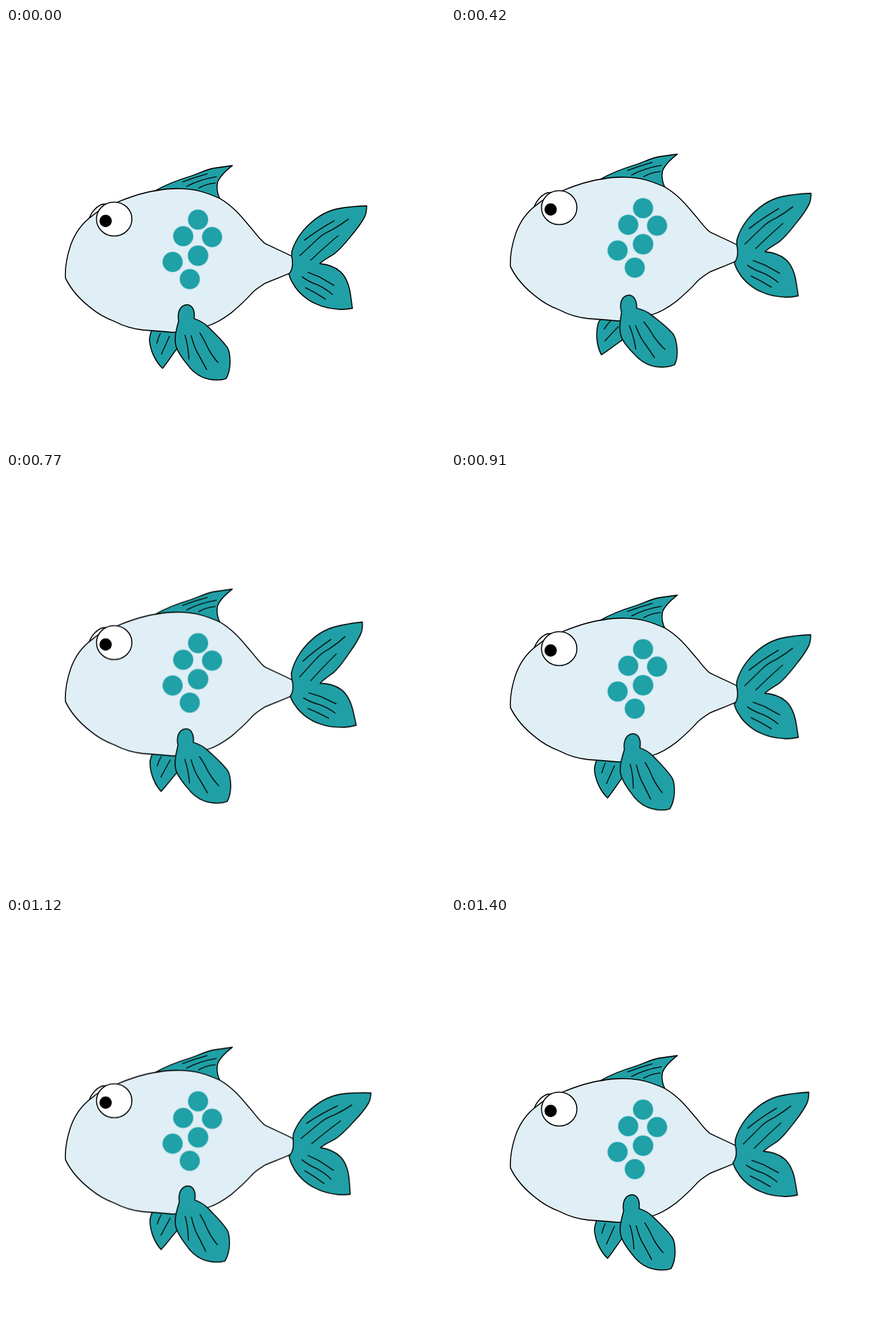
Recreate the animation shown at these times as an HTML page without scripts. Size 768x729 px, loop 1470 ms.

```html
<!DOCTYPE html>
<html lang="en">
<head>
<meta charset="utf-8">
<title>Swimming fish</title>
<style>
  html, body { margin: 0; width: 100%; height: 100%; overflow: hidden; background: #fff; }
  svg { display: block; width: 768px; height: 729px; }
  path, .eye { stroke: #000; stroke-width: 1.8; stroke-linecap: round; stroke-linejoin: round; }
  .fin { fill: #20a0a6; }
  .rays { fill: none; stroke-width: 1.6; }
  .skin { fill: #e0eef6; }
  .eye { fill: #fff; }
  .spots { fill: #1fa1a7; stroke: #1fa1a7; stroke-opacity: .35; stroke-width: 2; }

  /* 21 poses of 70 ms; each segment steps once per pose */
  #fish, #tail, #front, #back { animation: 1470ms infinite; }
  #fish { animation-name: bob; }
  #tail { animation-name: wag; transform-origin: 500px 402px; }
  #front { animation-name: paddle; transform-origin: 345px 549px; }
  #back { animation-name: flap; transform-origin: 285px 557px; }

  @keyframes bob {
    0% { transform: translateY(0); animation-timing-function: steps(3); }
    14.285% { transform: translateY(-9.5px); animation-timing-function: steps(5); }
    38.095% { transform: translateY(-27px); animation-timing-function: steps(3); }
    52.38% { transform: translateY(-37.5px); animation-timing-function: steps(2); }
    61.904% { transform: translateY(-27px); animation-timing-function: steps(3); }
    76.19% { transform: translateY(-14.5px); animation-timing-function: steps(4); }
    95.238%, 100% { transform: translateY(0); }
  }
  @keyframes wag {
    0% { transform: translate(0, 0) rotate(0deg); animation-timing-function: steps(3); }
    14.285% { transform: translate(0, 0) rotate(2.7deg); animation-timing-function: steps(5); }
    38.095% { transform: translate(.3px, 0) rotate(-3.3deg); animation-timing-function: steps(2); }
    47.619% { transform: translate(0, -2px) rotate(-5.2deg); animation-timing-function: steps(1); }
    52.38% { transform: translate(0, -2.8px) rotate(-4.6deg); animation-timing-function: steps(2); }
    61.904% { transform: translate(0, 1.2px) rotate(-1.1deg); animation-timing-function: steps(3); }
    76.19% { transform: translate(2px, 1px) rotate(3.6deg); animation-timing-function: steps(4); }
    95.238%, 100% { transform: translate(-2.5px, -2.5px) rotate(-1.7deg); animation-timing-function: steps(1); }
  }
  @keyframes paddle {
    0% { transform: rotate(0deg); animation-timing-function: steps(3); }
    14.285% { transform: rotate(-3.4deg); animation-timing-function: steps(5); }
    38.095% { transform: rotate(-7.7deg); animation-timing-function: steps(3); }
    52.38% { transform: rotate(-1.8deg); animation-timing-function: steps(2); }
    61.904% { transform: rotate(2deg); animation-timing-function: steps(1); }
    66.666% { transform: rotate(2.4deg); animation-timing-function: steps(2); }
    76.19% { transform: rotate(1.8deg); animation-timing-function: steps(4); }
    95.238%, 100% { transform: rotate(0deg); }
  }
  @keyframes flap {
    0% { transform: translate(0, 0) rotate(0deg); animation-timing-function: steps(3); }
    14.285% { transform: translate(.5px, 1px) rotate(11deg); animation-timing-function: steps(5); }
    38.095% { transform: translate(1px, 2.5px) rotate(24deg); animation-timing-function: steps(3); }
    52.38% { transform: translate(0, 0) rotate(4deg); animation-timing-function: steps(2); }
    61.904% { transform: translate(0, 0) rotate(0deg); animation-timing-function: steps(3); }
    76.19% { transform: translate(0, 0) rotate(4deg); animation-timing-function: steps(4); }
    95.238%, 100% { transform: translate(0, 0) rotate(0deg); }
  }
</style>
</head>
<body>
<svg viewBox="0 0 768 729">
  <g id="fish">
    <g id="back">
      <path class="fin" d="M274 595C263 585 252 565 251 545C251 538 254 531 257 522L304 518L306 552C293 567 284 583 274 595Z"/>
      <path class="rays" d="M270 534Q266 542 264 551M286 539Q280 552 272 570"/>
    </g>

    <path class="fin" d="M262 284C278 275 300 266 320 260C334 256 350 247 364 245L396 240.500C385 249 374 259 370 270C368 280 370 291 374 298L350 302L290 296Z"/>
    <path class="rays" d="M309 269Q330 261 352 255M316 277Q338 265 368 260M337 280Q351 272 366 271"/>

    <path class="eye" d="M144 338C147 324 160 308 173 307.500Q180 307 190 315L165 335Z"/>
    <path class="skin" d="M104 437C103 420 107 398 113 380C121 357 135 340 150 329C164 317 180 309 196 304C218 295 240 287 265 284C290 279 322 280 340 285.500C353 289 364 293.500 374 298C400 313 415 334 430 351C437 360 444 369 452 376C465 383 485 391 504 401L504 425C486 434 462 442 452 447C440 455 434 458 428 466C418 477 407 487 394 498C382 507 366 517 352 521C335 528 312 532 290 532C270 530 255 529 240 528C222 526 205 521 190 513C174 507 160 499 148 489C130 475 113 456 104 437Z"/>

    <g class="spots">
      <circle cx="336" cy="335" r="17.300"/>
      <circle cx="310" cy="364" r="17.300"/>
      <circle cx="360.500" cy="365.500" r="17.300"/>
      <circle cx="336" cy="398" r="17.600"/>
      <circle cx="291.500" cy="409" r="17.300"/>
      <circle cx="321.500" cy="439" r="17.300"/>
    </g>

    <ellipse class="eye" cx="189.300" cy="334" rx="31" ry="29.700"/>
    <circle cx="174.300" cy="337.200" r="10.700"/>

    <g id="tail">
      <path class="fin" d="M500 391C504 376 512 364 520 354C535 337 556 321 580 316C596 313 612 311.500 631 311C631 318 630 324 628 329C620 345 609 357 600 368C591 379 583 388 574 395C565 401 557 404 549 412C562 413 576 418 585 426C596 436 601 453 603 468L606 490C596 492 590 492 585 492C570 491 556 489 544 483C526 476 510 461 503 448C498 441 496 434 495 430C502 422 502 410 500 400Z"/>
      <path class="rays" d="M522 371Q544 354 574 337M514 398L545 369Q554 360 570 353Q586 344 599 334M533 406Q554 386 581 363M528 427L548 435L574 450M518 435Q530 444 545 449Q560 456 571 466M524 454L541 463L559 474"/>
    </g>

    <g id="front">
      <path class="fin" d="M302 512C300 502 302 492 308 487C314 482 322 483 326 489C330 495 330 501 329 508C338 511 346 515 353 522C365 534 379 546 388 560C391 566 392 574 392 584C392 596 389 606 385 613C374 617 358 616 345 611C333 606 324 598 317 588C308 577 300 566 297 555C294 541 298 527 302 512Z"/>
      <path class="rays" d="M313 537Q319 556 320 579M324 538Q330 561 338 573L351 597M339 533Q347 545 353 559Q361 574 371 585"/>
    </g>
  </g>
</svg>
</body>
</html>
```
